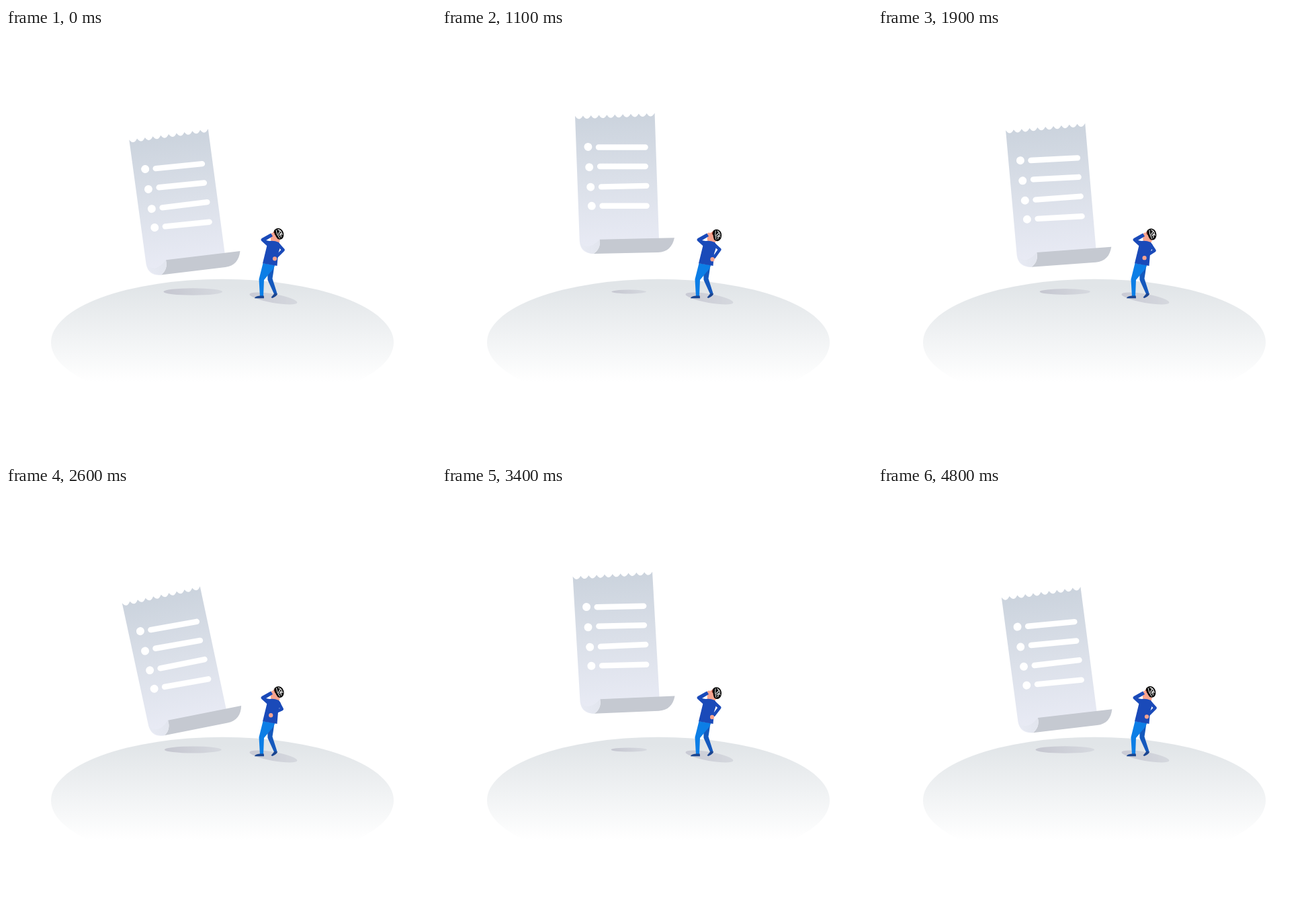
An HTML page with a canvas that plays this animation: 640 by 640 pixels, repeating every 4.9 s.

```html
<!DOCTYPE html>
<html lang="en">
<head>
<meta charset="utf-8">
<title>Floating receipt</title>
<style>
  html, body { margin: 0; width: 100%; height: 100%; overflow: hidden; background: #fff; }
  canvas { display: block; width: 640px; height: 640px; }
</style>
</head>
<body>
<canvas id="stage" width="640" height="640"></canvas>
<script>
const ctx = document.getElementById('stage').getContext('2d');
const LOOP = 4900, STEP = 100, BOB = 2400;
const SKIN = '#f8a48f', SHIRT = '#1a4ab9', HAT = '#050505';

// Tilt of the receipt: [time, degrees], eased between the keys
const TILT = [[50, 7.8], [1450, 1.1], [2550, 12.2], [3750, 1.2], [4950, 7.8]];

const rad = d => d * Math.PI / 180;
const ease = p => (1 - Math.cos(Math.PI * p)) / 2;

function tiltAt(t) {
  if (t < TILT[0][0]) t += LOOP;
  const i = TILT.findIndex((k, n) => n > 0 && t <= k[0]);
  const [t0, a] = TILT[i - 1], [t1, b] = TILT[i];
  return a + (b - a) * ease((t - t0) / (t1 - t0));
}

function fade(x0, y0, x1, y1, ...colors) {
  const g = ctx.createLinearGradient(x0, y0, x1, y1);
  colors.forEach((c, i) => g.addColorStop(i / (colors.length - 1), c));
  return g;
}

function shape(d, fill) {
  ctx.fillStyle = fill;
  ctx.fill(new Path2D(d));
}

function line(d, color, width) {
  ctx.strokeStyle = color;
  ctx.lineWidth = width;
  ctx.stroke(new Path2D(d));
}

function oval(x, y, rx, ry, fill, turn = 0) {
  ctx.fillStyle = fill;
  ctx.beginPath();
  ctx.ellipse(x, y, rx, ry, rad(turn), 0, Math.PI * 2);
  ctx.fill();
}

function around(x, y, degrees, draw) {
  ctx.save();
  ctx.translate(x, y);
  ctx.rotate(rad(degrees));
  draw();
  ctx.restore();
}

function ground(low) {
  oval(322, 468, 255, 94.3, fade(0, 385, 0, 527, '#e1e5e8', '#fff'));
  const rx = 25.7 + 18.2 * low;
  oval(278.3, 392.5, rx, 2.9 + 2.3 * low, fade(278 - rx, 0, 278 + rx, 0, '#c5c6d0', '#d6d9df'));
  oval(398, 402.4, 36, 6.6, fade(362, 0, 434, 0, '#c9cad4', '#d5d8de'), 10);
}

function receipt() {
  const w = 118.6, teeth = 10;
  let top = 'M0 187L0 0';
  for (let i = 0; i < teeth; i++) {
    const x = i * w / teeth;
    top += `Q${x + 5.5} 9.5 ${x + w / teeth} 0`;
  }
  shape(top + 'L118.2 188L30 188L20 206Q1 205 0 187Z', fade(0, 0, 0, 200, '#cbd3dd', '#dbe0e9', '#e9ebf5'));
  shape('M30 185L141.2 186.7C138 200 130 207.5 116 207.5L20 206C27 202 31 195 30 185Z', '#c5c9d1');
  shape('M2 189Q12 202 30 185C31 195 27 202 20 206Q5 204 1 190Z', fade(2, 0, 31, 0, '#e7eaf3', '#e2e5ee'));

  // Each row: dot x, dot y, bar from x, y to x, y
  const rows = [
    [17.7, 46.7, 33.2, 47.9, 102.8, 50.4],
    [18.4, 77, 34.3, 76.5, 101.9, 78.9],
    [19.3, 106.6, 35.1, 106.9, 102.4, 107.8],
    [19.9, 134.8, 35.6, 135.3, 101.7, 137.6]
  ];
  for (const [x, y, x0, y0, x1, y1] of rows) {
    oval(x, y, 6, 6, '#fff');
    line(`M${x0} ${y0}L${x1} ${y1}`, '#fff', 8.4);
  }
}

function head() {
  shape('M-1 6L-7 0C-8 -4 -6 -10 -1 -12L6 -12L6 1L3 5Z', SKIN);
  oval(2, -11, 2, 3, '#7c2e22', 15);
  shape('M2 -14.5C6 -18 12 -16 13.6 -11C15 -6 13.5 -1 9 1C6.5 1.6 4.5 .6 3 -1Q.5 -8 2 -14.5Z', HAT);
  line('M5.2 -14.2Q3.6 -8 6 -1', '#fff', .9);
  line('M8 -14Q12 -12 11.6 -7M6 -7L10 -11M7 -5Q10 -8 12.2 -5M8.5 -2Q10 -5 9.5 -8', '#fff', 1.1);
}

function man(low, reach) {
  shape('M389 352L399.5 353Q398 364 396.5 373L403.5 395L399.5 397L389.5 375Z', '#1559bd');
  shape('M382.5 350L400 353Q399 358 394 363L384 375L383 400L378 400L376.5 374Z', '#0c7ee6');
  shape('M370 402.2Q370.5 399.5 378 398.6L383.8 398.6L384 402.2Z', '#1b458f');
  shape('M400 394.5L404.3 395.5Q403 399 396.5 402L394.5 401Z', '#1b458f');

  around(402, 316, -20 * low, head);
  oval(397, 307.6, 2.6, 3.2, SKIN, 25);
  shape('M394.2 305.4L397 310L387 316L394 317.5L389.5 325.3L380.4 317Q378.4 315 380.8 313Z', SHIRT);
  shape('M390 317.4Q398 315.5 406 319L409 323.5L405 336L403.5 354L382 350.3Z', SHIRT);

  // Arm on the hip
  const hx = 402.3 - reach, hy = 345 - reach * .35;
  const ex = 413.4 - reach * .32, ey = 329.6 + reach * .3;
  line(`M406 323L${ex} ${ey}L${hx + 3} ${hy - 4}`, SHIRT, 4.6);
  oval(hx + .2, hy - .8, 3.1, 3.2, SKIN);
}

function draw(t) {
  const low = (1 + Math.cos((t + 22) / BOB * Math.PI * 2)) / 2;
  const reach = (t > 1200 && t < 3600 ? 9 : 2.5) * low;
  ctx.clearRect(0, 0, 640, 640);
  ctx.lineCap = 'round';
  ctx.lineJoin = 'round';
  ground(low);
  around(308.7, 284.7 + 23.8 * low, -tiltAt(t), () => {
    ctx.translate(-105, -158);
    receipt();
  });
  man(low, reach);
}

const start = performance.now();
function tick() {
  const t = (performance.now() - start) % LOOP;
  draw(Math.floor(t / STEP) * STEP);
  requestAnimationFrame(tick);
}
tick();
</script>
</body>
</html>
```
